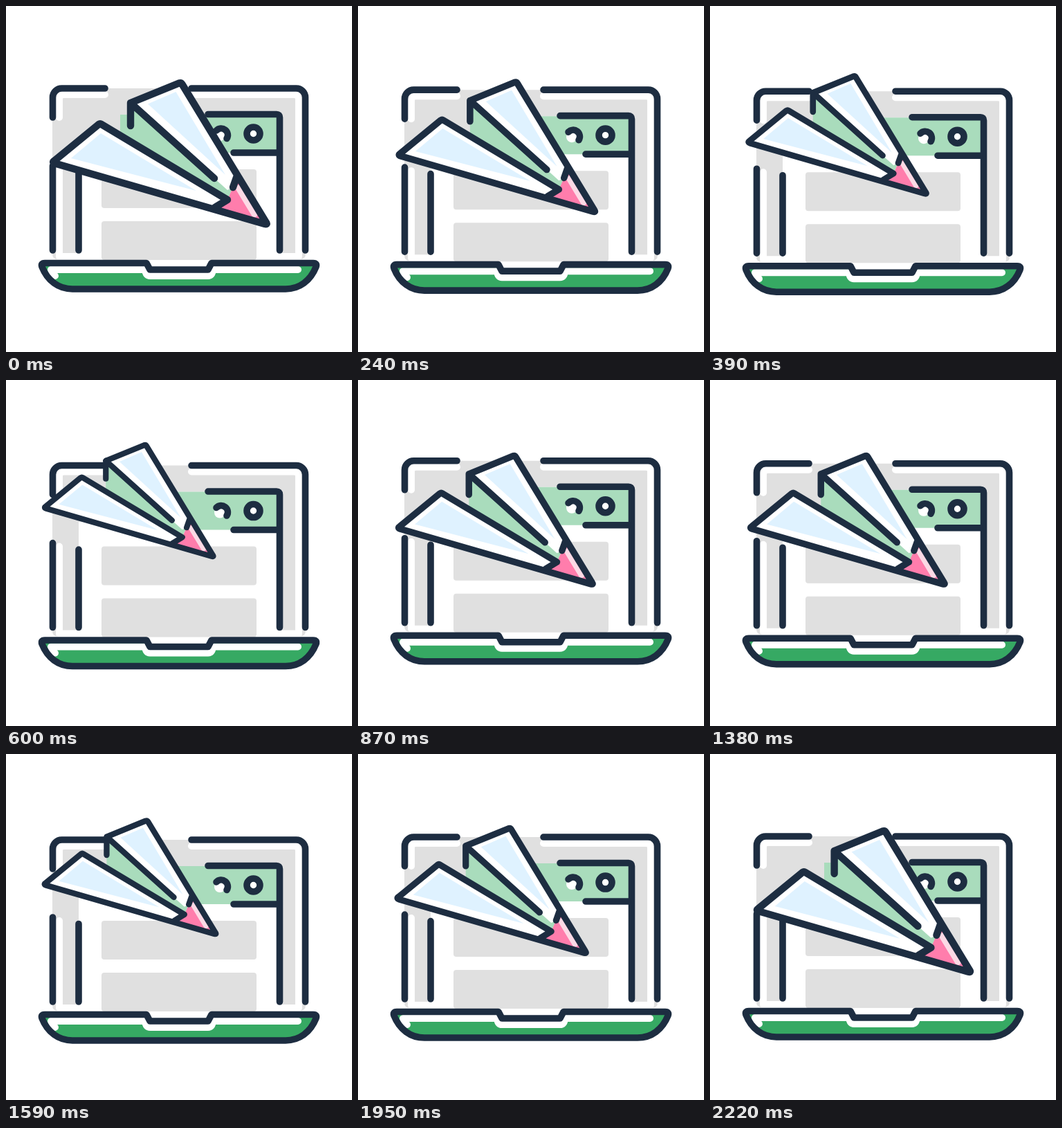
Write an HTML page that moves like this. It is 500x500 px and loops after 2.25 s.

```html
<!DOCTYPE html>
<html lang="en">
<head>
<meta charset="utf-8">
<title>Paper plane and laptop</title>
<style>
  html, body { margin: 0; width: 100%; height: 100%; overflow: hidden; background: #fff; }
  svg { display: block; width: 100vw; height: 100vh; }
  .ink { fill: none; stroke: #1d2d41; stroke-width: 9.6; stroke-linecap: round; stroke-linejoin: round; }
  .shine { fill: none; stroke: #fff; stroke-width: 10; stroke-linecap: round; stroke-linejoin: round; }
  #plane .ink { stroke-width: 10.4; }
  .grey { fill: #e0e0e0; }
  .mint { fill: #a9dcbc; }
  .green { fill: #36a963; }
  .sky { fill: #dff2ff; }
  .pink { fill: #ff7dac; }
  .white { fill: #fff; }
</style>
</head>
<body>
<svg viewBox="0 0 500 500">
  <g id="laptop">
    <!-- screen -->
    <path class="grey" d="M67 132A13 13 0 0 1 80 119H420A13 13 0 0 1 433 132V358Q433 366 424 366H75Q67 366 67 358Z"/>
    <path class="shine" d="M77 161V135Q77 128 84 128H143M268 128H416Q423 128 423 135V362H77V236"/>
    <!-- browser window -->
    <path class="white" d="M105 200H165V157H391V368H105Z"/>
    <path class="mint" d="M165 157H395V212H165Z"/>
    <rect class="grey" x="138" y="236" width="224" height="56" rx="4"/>
    <rect class="grey" x="138" y="311" width="224" height="56" rx="4"/>
    <circle class="white" cx="309" cy="187" r="8"/>
    <path class="ink" d="M304 180A9.5 9.5 0 0 1 319 191.500"/>
    <circle class="ink" cx="357.5" cy="184.5" r="9.5" style="fill:#fff"/>
    <path class="ink" d="M292 156.5H391Q395.500 156.5 395.500 161V353M329 212H395M105 240.500V353"/>
    <path class="ink" d="M67.5 161V132A13 13 0 0 1 80.5 119H143M268 119H419.500A13 13 0 0 1 432.5 132V353M67.5 231V353"/>
    <!-- base -->
    <path id="base" class="green" d="M56 371.5H203L208 381H292L297 371.5H444Q450 371.5 448 377C440 397 424 409 404 409H96C76 409 60 397 52 377Q50 371.500 56 371.500Z"/>
    <path class="shine" d="M71 390Q66 386 65 381H201Q202 390 208 390H292Q298 390 299 381H422"/>
    <use href="#base" id="rim"/>
  </g>
  <g id="plane">
    <path class="mint" d="M180 140L301 249L330 250L328 262L320 280L180 196Z"/>
    <path class="white" d="M180 140L251 111L334 246L328 262L320 266Z"/>
    <path class="sky" d="M205 141.500L245.500 124L317 244Z"/>
    <path class="white" d="M69 226L136 170L320 280L302 291Z"/>
    <path class="sky" d="M94 220L137 184L275 267Z"/>
    <path class="pink" d="M334 246L376 314L302 291L320 280L328 262Z"/>
    <path d="M336 263L359 301" fill="none" stroke="#fcd9e5" stroke-width="9" stroke-linecap="round"/>
    <path class="ink" d="M180 173V140L250 111.500Q253 110.500 254.500 113L376 313Q378 316 374 315L71 227.500Q66 226 70 223.500L134 171Q136 169.500 138 171L320 280L302 291M180 140L301 249M334 245L328 262"/>
  </g>
</svg>
<script>
  const LOOP = 2250, STEP = 30;
  const laptop = document.getElementById('laptop');
  const plane = document.getElementById('plane');

  // The rim reuses the base outline without its fill.
  const rim = document.getElementById('base').cloneNode();
  rim.removeAttribute('id');
  rim.setAttribute('class', 'ink');
  document.getElementById('rim').replaceWith(rim);

  const ease = u => (1 - Math.cos(Math.PI * u)) / 2;
  const bob = [[0, 0], [528, 5], [1056, -5], [1584, 5], [2112, 0], [LOOP, 0]];

  function bobAt(t) {
    const i = bob.findIndex(([end]) => end > t);
    const [t0, y0] = bob[i - 1], [t1, y1] = bob[i];
    return y0 + (y1 - y0) * ease((t - t0) / (t1 - t0));
  }

  function draw(t) {
    laptop.setAttribute('transform', `translate(0 ${bobAt(t)})`);

    // Two flights per loop along a shallow arc, shrinking on the way out.
    const u = ease(2 * t / (LOOP / 2));
    const arc = u * (1 - u);
    const x = 222.5 - 45 * (u + 0.4 * arc);
    const y = 270 - 51.5 * (u - 0.47 * arc);
    const scale = 1 - 0.213 * u;
    plane.setAttribute('transform', `translate(${x} ${y}) scale(${scale}) translate(-222.5 -270)`);
  }

  const start = performance.now();
  function tick(now) {
    const t = Math.max(0, now - start) % LOOP;
    draw(Math.floor(t / STEP) * STEP);
    requestAnimationFrame(tick);
  }
  draw(0);
  requestAnimationFrame(tick);
</script>
</body>
</html>
```
